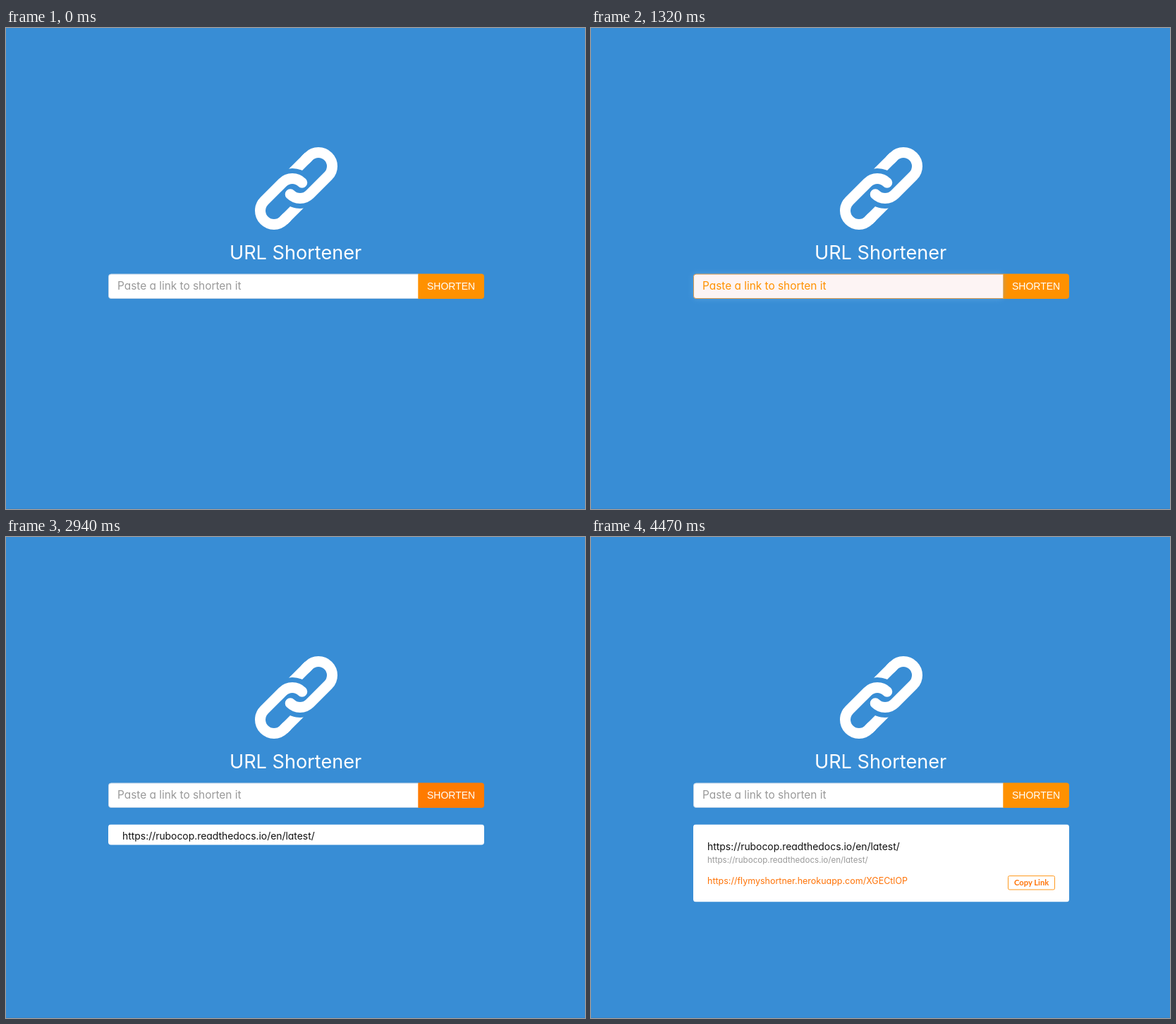
An HTML page that plays this animation: 821 px wide and 682 px high, repeating every 4530 ms.

```html
<!DOCTYPE html>
<html lang="en">
<head>
<meta charset="utf-8">
<title>URL Shortener</title>
<style>
  html, body { margin: 0; height: 100%; overflow: hidden; background: #388dd5; }
  svg { display: block; width: 100vw; height: 100vh; }
  text { white-space: pre; }
  .round { font-family: Inter, Lato, sans-serif; font-feature-settings: "cv11"; }
  .plain { font: 14px "Liberation Sans", Arial, sans-serif; }
</style>
</head>
<body>
<svg viewBox="0 0 821 682">
  <defs>
    <mask id="gap" maskUnits="userSpaceOnUse" x="340" y="160" width="140" height="140">
      <rect x="340" y="160" width="140" height="140" fill="#fff"/>
      <circle cx="406" cy="233" r="34" fill="#000"/>
    </mask>
    <clipPath id="cardClip"><rect id="clipBox" x="145" y="407.5" width="533" rx="4"/></clipPath>
    <g id="half" fill="none" stroke="#fff" stroke-width="15">
      <path d="M403.2 235.8A19.5 19.5 0 0 0 430.8 235.8L456.8 209.8A19.5 19.5 0 0 0 429.2 182.2L425 186.4" stroke-linecap="round"/>
      <path d="M429.2 182.2L395 216.4" mask="url(#gap)"/>
    </g>
  </defs>

  <rect width="821" height="682" fill="#388dd5"/>
  <rect y="681" width="821" height="1" fill="#3585c9"/>

  <use href="#half"/>
  <use href="#half" transform="rotate(180 411.5 227.5)"/>
  <text class="round" x="317" y="328" font-size="27.1" fill="#fff">URL Shortener</text>

  <path id="button" d="M584 348.5H674a4 4 0 0 1 4 4V380a4 4 0 0 1-4 4H584z"/>
  <text id="label" class="plain" x="597" y="371">SHORTEN</text>
  <rect id="glow" x="145" y="348.5" width="439" height="35.5" rx="4" fill="#66afe9" style="filter:blur(4px)"/>
  <path id="field" d="M584.3 349H149a3.5 3.5 0 0 0-3.5 3.5V380a3.5 3.5 0 0 0 3.5 3.5H584.3"/>
  <text id="hint" class="round" x="158" y="371" font-size="15.4">Paste a link to shorten it</text>
  <text id="typed" class="plain" x="158" y="371">https://rubocop.readthedocs.io/en/latest/</text>
  <rect id="caret" y="358" width="1" height="16" fill="#ff9100"/>

  <g id="card" clip-path="url(#cardClip)">
    <rect x="145" y="407.5" width="533" height="110" fill="#fff"/>
    <g id="content" class="round">
      <text x="165" y="444" font-size="13.9" fill="#111">https://rubocop.readthedocs.io/en/latest/</text>
      <text x="165" y="462" font-size="11.6" fill="#999">https://rubocop.readthedocs.io/en/latest/</text>
      <text x="165" y="492" font-size="12.5" fill="#ff7408">https://flymyshortner.herokuapp.com/XGECtlOP</text>
      <rect x="591.5" y="480.5" width="66" height="19.5" rx="2" fill="#fff" stroke="#ff9a1f"/>
      <text x="600" y="494" font-size="11.2" style="font-family:Lato,sans-serif;font-weight:700" fill="#ff7408">Copy Link</text>
    </g>
  </g>
</svg>
<script>
const LOOP = 4530;
const WHITE = [255, 255, 255], BLUSH = [253, 244, 244], ORANGE = [255, 145, 0];
const el = id => document.getElementById(id);
const set = (id, attrs) => { for (const k in attrs) el(id).setAttribute(k, attrs[k]); };
const show = (id, on) => set(id, { visibility: on ? 'visible' : 'hidden' });
const during = (t, from, to) => t >= from && t < to;
const progress = (t, start, length) => Math.min(1, Math.max(0, (t - start) / length));
const ease = p => 1 - (1 - p) ** 2.3;
const swing = p => 0.5 - Math.cos(p * Math.PI) / 2;
const mix = (a, b, k) => `rgb(${a.map((v, i) => Math.round(v + (b[i] - v) * k))})`;

function draw(t) {
  const blur = ease(progress(t, 2565, 155));
  const hover = ease(progress(t, 280, 440)) * (1 - blur);
  const focus = ease(progress(t, 839, 121)) * (1 - blur);
  set('field', {
    fill: mix(WHITE, BLUSH, hover),
    stroke: mix([194, 212, 229], [218, 152, 78], hover)
  });
  set('glow', { opacity: 0.6 * focus });

  const filled = during(t, 1710, 2850);
  show('hint', !filled);
  show('typed', filled);
  set('hint', { fill: mix([153, 153, 153], ORANGE, hover) });
  set('typed', { fill: mix([68, 68, 68], ORANGE, hover) });
  show('caret', during(t, 840, 1320) || during(t, 1800, 2280));
  set('caret', { x: filled ? 407 : 158 });

  const busy = during(t, 2580, 2850);
  const pointed = during(t, 2100, 4470);
  set('button', { fill: busy ? '#3580c1' : pointed ? '#ff7b00' : '#ff9100' });
  set('label', { fill: busy ? '#a8cbea' : '#fff' });

  // The card opens by growing its height and its 20px padding together.
  const open = swing(progress(t, 2804, 400));
  show('card', t >= 2850);
  set('clipBox', { height: 110 * open });
  set('content', { transform: `translate(0 ${-20 * (1 - open)})` });
}

const start = performance.now();
function frame() {
  draw((performance.now() - start) % LOOP);
  requestAnimationFrame(frame);
}
frame();
</script>
</body>
</html>
```
